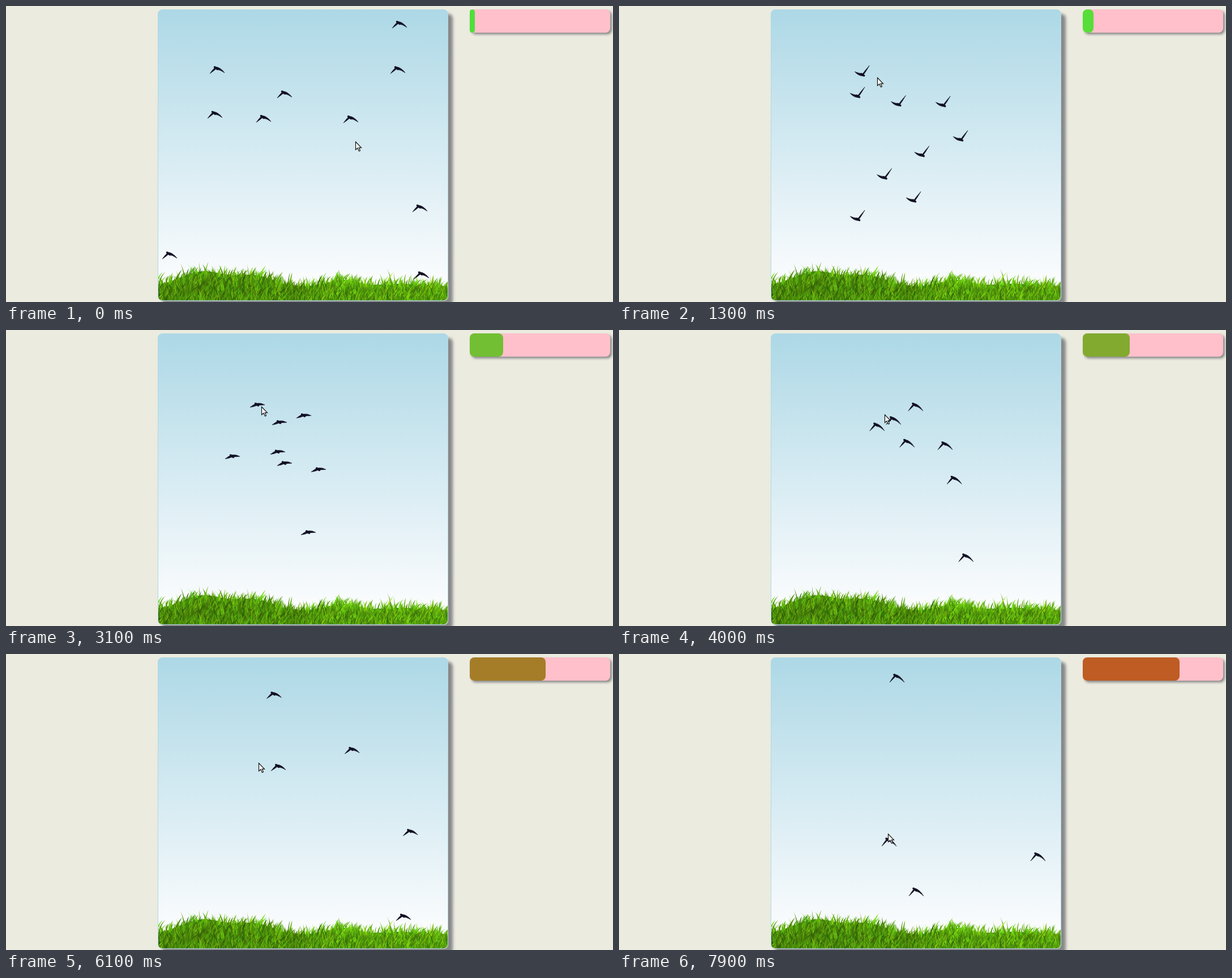
An HTML page with a canvas that plays this animation: 1072x522 px, repeating every 8 s.

```html
<!DOCTYPE html>
<html lang="en">
<head>
<meta charset="utf-8">
<title>Birds over grass</title>
<style>
  html, body { margin: 0; width: 100%; height: 100%; overflow: hidden; background: #ebebdf; }
  div, i, canvas { position: absolute; box-sizing: border-box; }
  #sky {
    left: 268px; top: 6px; width: 513px; height: 514px; overflow: hidden;
    border: 1px solid #add8e6; border-radius: 8px; box-shadow: 8px 8px 5px #888;
    background: linear-gradient(#add8e6, #fdfdfe 96%);
  }
  #grass { left: -1px; top: 413px; }
  #bar {
    left: 819px; top: 6px; width: 248px; height: 41px;
    border-radius: 8px; background: #ffc0cb; box-shadow: 3px 3px 4px #888;
  }
  #fill { left: 0; top: 0; height: 41px; border-radius: 8px; }
  #air { left: 0; top: 0; }
</style>
</head>
<body>
<div id="sky"><canvas id="grass" width="513" height="100"></canvas></div>
<div id="bar"><i id="fill"></i></div>
<canvas id="air" width="1072" height="522"></canvas>
<script>
const $ = id => document.getElementById(id);
const air = $('air').getContext('2d');
const LOOP = 8000;
const INK = '#121024';

// Every path passes its points at these times
const knots = [0, 700, 1800, 3100, 5200, 6900, 7900];
const pointer = [[617,239], [474,135], [441,119], [451,135], [492,168], [394,219], [475,317]];
// A bird with a caught time ends its path at the pointer
const birds = [
  { path: [[609,200], [525,263], [543,253], [552,246], [608,149], [615,194], [477,332]] },
  { path: [[731,357], [543,309], [501,362], [534,357], [718,462], [684,467], [525,420]] },
  { path: [[289,440], [383,404], [453,343], [492,235], [726,305], [701,326], [740,358]] },
  { path: [[734,475], [614,301], [594,171], [526,151], [521,116], [420,24], [491,43]] },
  { caught: 7100, path: [[455,199], [491,312], [450,285], [480,215], [547,180], [407,223]] },
  { caught: 5400, path: [[695,33], [617,145], [535,190], [483,163], [487,156]] },
  { caught: 4300, path: [[692,113], [554,151], [443,183], [400,223]] },
  { caught: 3300, path: [[369,192], [396,152], [442,155], [444,132]] },
  { caught: 2200, path: [[492,156], [432,120], [427,112]] },
  { caught: 1200, path: [[373,113], [423,121]] }
];

function along(path, t, end = LOOP) {
  let i = 0;
  while (i < path.length - 2 && knots[i + 1] <= t) i++;
  if (t > knots[path.length - 1]) i = path.length - 1;
  const from = path[i], to = path[i + 1] || along(pointer, Math.min(end, 7900));
  const f = Math.min(1, (t - knots[i]) / (Math.min(end, knots[i + 1] || LOOP) - knots[i]));
  return from.map((v, j) => v + (to[j] - v) * f);
}

// The picture refreshes quickly at first, then in slower bursts
function stepTime(t) {
  if (t < 3100) return Math.min(2400, Math.floor(t / 100) * 100);
  const start = [7700, 6500, 5400, 4300, 3100].find(s => s <= t);
  const d = t - start;
  return start + (d >= 900 ? 900 : Math.floor(d / 200) * 200);
}

// A sliver from (x, y) to the tip, bent at the elbow
function wing(x, y, ex, ey, tx, ty) {
  air.beginPath();
  air.moveTo(x, y - 1.5);
  air.quadraticCurveTo(ex, ey - 2, tx, ty);
  air.quadraticCurveTo(ex, ey + 2.5, x, y + 2.5);
  air.closePath();
  air.fill();
  air.stroke();
}

// lift runs from -1, wings down, to 1, wings up
function drawBird(x, y, lift) {
  const headX = -2 + 2 * lift, headY = -2 + 5.5 * lift;
  const tailX = 3.5 + 1.5 * lift, tailY = 5.5 + 4.5 * lift;
  air.save();
  air.translate(x, y);
  air.fillStyle = air.strokeStyle = INK;
  air.lineWidth = .6;
  wing(headX + 1, headY + 2, -7, 2 + 3 * lift, -13, 3.5 - 3.5 * lift);
  wing(headX + 1, headY + 2, 6, -2 + lift, 13, -2 - 9 * lift);
  air.lineCap = 'round';
  air.lineWidth = 3.5;
  air.beginPath();
  air.moveTo(headX - 1, headY + 1);
  air.lineTo(headX + 2, headY + 3);
  air.lineTo((headX + tailX) / 2 + 1, (headY + tailY) / 2 + .5);
  air.stroke();
  air.restore();
}

function drawPointer(x, y) {
  air.save();
  air.translate(Math.round(x) + .5, Math.round(y) + .5);
  air.fillStyle = '#fff';
  air.strokeStyle = '#111';
  air.lineWidth = 1.2;
  const arrow = new Path2D('M0 0V14L3.3 11L6 16.5L8 15.5L5.7 10.3H10Z');
  air.fill(arrow);
  air.stroke(arrow);
  air.restore();
}

function drawGrass() {
  const g = $('grass').getContext('2d');
  let seed = 7;
  const rnd = () => (seed = seed * 16807 % 2147483647) / 2147483647;
  const bump = (x, mid, width, height) => height * Math.exp(-(((x - mid) / width) ** 2));
  const ridge = x => 68 - bump(x, 80, 55, 26) - bump(x, 170, 45, 18)
    - bump(x, 325, 35, 11) - bump(x, 430, 50, 4);

  g.fillStyle = '#458d0c';
  for (let x = 0; x < 513; x++) g.fillRect(x, ridge(x) + 6, 1, 100);

  const count = 3000;
  for (let i = 0; i < count; i++) {
    const depth = i / count, x = rnd() * 525 - 6, top = ridge(x);
    const y = top + 10 + depth * (105 - top);
    const wisp = depth < .3 && rnd() < .12 ? 10 : 0;
    const height = 9 + rnd() * 13 + wisp;
    const lean = (rnd() - .5) * 24, w = .6 + rnd() * .8;
    const sunny = 4 * (x > 270) + 6 * (depth < .2);
    g.fillStyle = `hsl(${82 + rnd() * 14}, 84%, ${17 + rnd() * 25 + sunny}%)`;
    g.beginPath();
    g.moveTo(x - w, y);
    g.quadraticCurveTo(x - w, y - height * .6, x + lean, y - height);
    g.quadraticCurveTo(x + w, y - height * .5, x + w, y);
    g.fill();
  }
}

function drawProgress(t) {
  const s2 = (t / 1000) ** 2;
  const width = Math.round(9 + 274 * s2 / (s2 + 43));
  const green = Math.min(222, 244 - width * .89);
  $('fill').style.width = width + 'px';
  $('fill').style.background = `rgb(${74 + width * .68}, ${green}, ${59 - width * .143})`;
}

function render(now) {
  const t = stepTime(now % LOOP);
  drawProgress(t);
  air.clearRect(0, 0, 1072, 522);
  const lift = Math.cos((t - 5200) / 490 * 2 * Math.PI);
  for (const { path, caught = LOOP } of birds)
    if (t < caught) drawBird(...along(path, t, caught), lift);
  drawPointer(...along(pointer, t));
}

drawGrass();
const began = performance.now();
function loop() {
  render(performance.now() - began);
  requestAnimationFrame(loop);
}
loop();
</script>
</body>
</html>
```
